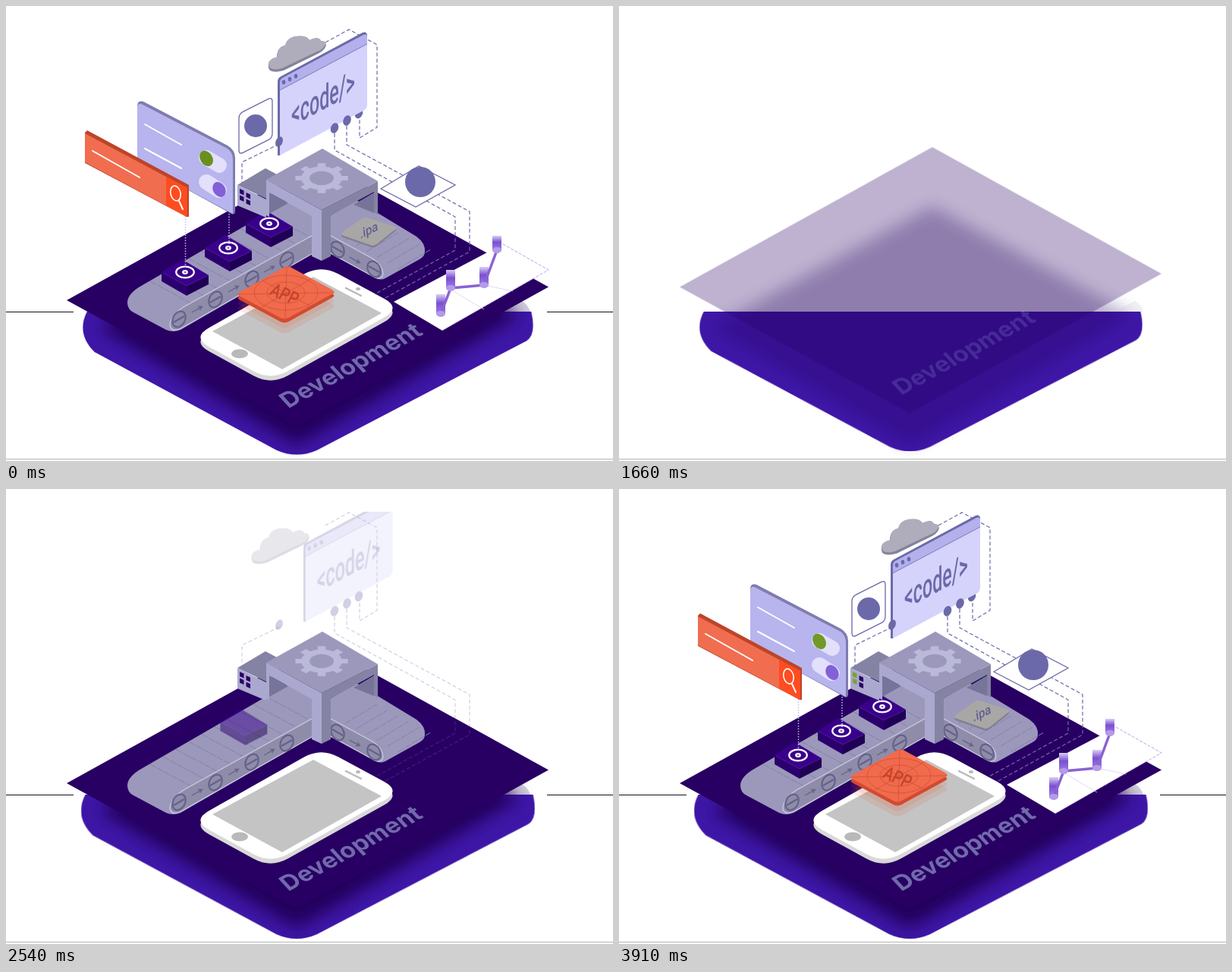
These frames come from a looping animation (800 by 600 pixels, 3960 ms). An HTML page:

```html
<!DOCTYPE html>
<html lang="en">
<head>
<meta charset="utf-8">
<title>Development</title>
<style>
html,body{margin:0;width:100%;height:100%;overflow:hidden;background:#fff}
svg{display:block;width:800px;height:600px}
text{font-family:Roboto,"Open Sans",sans-serif}
.dash{fill:none;stroke:#6b69a9;stroke-width:1.2;stroke-dasharray:5 3}
.ink{fill:#6b69a9}
.card{fill:#fff;stroke:#6b69a9;stroke-width:1.3}
.white{fill:none;stroke:#fff;stroke-width:2;stroke-linecap:round}
.dots{stroke:#c3bcec;stroke-width:1.5;stroke-dasharray:1.5 2}
.pill{stroke:#e2e0fa;stroke-width:20;stroke-linecap:round}
.grid{fill:none;stroke:#cf5238;stroke-width:.8}
</style>
</head>
<body>
<svg viewBox="0 0 800 600">
<defs>
  <path id="tray" d="M103 403Q88 432 113 457L356 588Q383 600 410 588L690 442Q703 433 696 403Z"/>
  <clipPath id="stage"><rect y="30" width="800" height="564"/></clipPath>
  <clipPath id="low"><rect y="403" width="800" height="191"/></clipPath>
  <clipPath id="shade"><path d="M0 0H800V403H0Z"/><use href="#tray"/></clipPath>
  <filter id="blur" x="-10%" y="-10%" width="120%" height="120%"><feGaussianBlur stdDeviation="11"/></filter>
  <linearGradient id="bar" x2="0" y2="1"><stop stop-color="#d9cff6"/><stop offset=".45" stop-color="#7a4fd0"/><stop offset="1" stop-color="#9d7ee4"/></linearGradient>
  <linearGradient id="haze" x2="0" y2="1"><stop stop-color="#fff" stop-opacity=".1"/><stop offset="1" stop-color="#fff" stop-opacity=".5"/></linearGradient>
  <g id="wheel" fill="none" stroke="#65628a" stroke-width="2.2"><ellipse rx="8" ry="11" transform="rotate(28)"/><path d="M-7 4L7 -4"/></g>
  <path id="arrow" d="M-7 4L5 -2.6M1 -3.5L6.5 -3.5L3.5 1" fill="none" stroke="#65628a" stroke-width="1.3"/>
</defs>
<path d="M0 597.5H800" stroke="#b4b4b4"/>
<path id="sides" stroke="#14101c" d="M0 403.5H89M713 403.5H800"/>
<g clip-path="url(#low)"><use id="base" href="#tray" fill="#3f17a8"/></g>

<g clip-path="url(#stage)"><g id="scene">
  <g id="shadow">
    <path fill="#d3cfdb" d="M652 403L680 389Q688 394 691 403Z"/>
    <g clip-path="url(#shade)"><path fill="#24005c" filter="url(#blur)" d="M413 264L122 424L383 580L678 408Z"/></g>
  </g>
  <g id="plate">
    <path fill="#280063" d="M80 388L413 203.5L715 370.5L383 554Z"/>
    <text transform="matrix(.876 -.482 .66 .72 372 531)" font-size="31.5" font-weight="700" fill="#716aac" style="font-family:Inter,'Open Sans',sans-serif">Development</text>
  </g>

  <g id="belts">
    <path fill="#9c98bc" d="M160 391Q160 379 180 368L372 257L403 275V327L230 427Q220 431 211 427L168 404Q160 400 160 391Z"/>
    <g id="slatsL" stroke="#8582a6" stroke-dasharray="9 1.5"></g>
    <path fill="#8f8caa" stroke="#cccbe2" stroke-width="1.3" d="M403 303L234 397Q217 408 216 421Q218 431 231 425L403 327"/>
    <path fill="#9c98bc" d="M428 276L462 256L541 304Q553 313 552 324Q552 330 545 334L500 359Q494 362 488 359L428 327Z"/>
    <g id="slatsR" stroke="#8582a6" stroke-dasharray="9 1.5"></g>
    <path fill="#8f8caa" stroke="#cccbe2" stroke-width="1.3" d="M428 303L483 333Q496 341 497 353Q495 362 486 358L428 326"/>
    <g id="wheels"></g>
  </g>

  <g id="box2"></g><g id="box3"></g><g id="box1"></g>

  <g id="machine">
    <path fill="#8583a3" d="M305 236L342 214L370 229L343 254Z"/>
    <path fill="#aaa8cf" d="M305 236L343 255V279L305 263Z"/>
    <g id="lamps"></g>
    <path fill="#77749a" d="M347 246L372 260L347 274ZM458 262L485 246V273Z"/>
    <path fill="#aaa8cf" d="M343 229L416 269V336L403 330V277L347 246V278L343 276Z"/>
    <path fill="#8583a3" d="M416 269L490 231V275L485 272V245L428 276V330L416 336Z"/>
    <path fill="#9c98bc" d="M417 188L490 231L416 269L343 229Z"/>
    <path id="gear" fill="#bbb9da" fill-rule="evenodd"/>
  </g>

  <g id="ipa">
    <path id="ipaEdge" fill="#817f8c"/><path id="ipaTop" fill="#a9a7a5"/>
    <text transform="matrix(.85 -.42 .12 1 467 307)" font-size="17" font-weight="500" fill="#625f91">.ipa</text>
  </g>

  <g id="phone">
    <path id="phoneEdge" fill="#d9d9d9"/><path id="phoneTop" fill="#fff"/>
    <path fill="#c4c4c4" d="M272 429L405 357L495 405L364 479Z"/>
    <ellipse cx="308" cy="458.5" rx="11" ry="6" fill="#b9b9b9"/>
    <path d="M448 372L468 382" stroke="#b9b9b9" stroke-width="2.5" stroke-linecap="round"/>
    <ellipse cx="464" cy="373" rx="3" ry="2" fill="#b9b9b9"/>
  </g>

  <g id="lines">
    <path class="dash" d="M360 182L311 206V233M421 48L452 31L489 51V160L466 174V148M433 168V190L592 278V322L486 380M449 158V183L611 271V324L498 386"/>
    <ellipse class="ink" cx="465" cy="141.5" rx="5" ry="7" transform="rotate(22 465 141.5)"/>
  </g>
  <g id="swift">
    <path id="cardS" class="card"/>
    <circle class="ink" cx="329" cy="158" r="15"/>
  </g>
  <g id="tools">
    <path class="card" d="M494 241L544 211L592 236L540 265Z"/>
    <circle class="ink" cx="546" cy="232" r="20"/>
  </g>
  <g id="cloud">
    <path fill="#85839a" d="M347 84Q342 71 357 68Q357 54 368 52Q371 40 386 40Q396 39 400 45Q412 39 415 46Q424 47 421 54Q419 59 411 63L366 85Q352 89 347 84Z"/>
    <path fill="#afadbb" d="M347 80Q343 70 358 67Q357 54 368 52Q371 40 386 39.5Q396 39 400 45Q412 39 415 46Q424 46 420 52Q418 57 410 60L364 82Q351 86 347 80Z"/>
  </g>
  <g id="window">
    <path class="ink" d="M358 100Q358 95 362 93L470 35Q475 33 476 38V44L361 197H358Z"/>
    <path fill="#d5d3fb" d="M361 101L476 39V130Q476 135 471 138L361 197Z"/>
    <path fill="#b3b0ec" d="M361 101Q361 97 364 95L471 38Q476 36 476 41V50L361 111Z"/>
    <path d="M361 111L476 50" stroke="#6b69a9" stroke-width=".8"/>
    <g class="ink"><ellipse cx="366" cy="100.5" rx="2.3" ry="3"/><ellipse cx="374" cy="96.5" rx="2.3" ry="3"/><ellipse cx="382" cy="92.5" rx="2.3" ry="3"/></g>
    <text class="ink" transform="matrix(.58 -.31 0 1.1 376 159)" font-size="40" font-weight="500">&lt;code/&gt;</text>
  </g>
  <g id="nodes" class="ink">
    <ellipse cx="360" cy="179" rx="4.5" ry="7" transform="rotate(22 360 179)"/>
    <ellipse cx="433" cy="161" rx="5" ry="7" transform="rotate(22 433 161)"/>
    <ellipse cx="449.5" cy="151" rx="5" ry="7" transform="rotate(22 449.5 151)"/>
  </g>

  <g id="chart">
    <g id="plain">
      <path fill="#fff" d="M511 390L655 314L715 348L575 428Z"/>
      <path d="M655 314L715 348L575 428" fill="none" stroke="#a78fe0" stroke-width=".8" stroke-dasharray="4 2"/>
      <path d="M586 374L630 400M630 368L668 376" stroke="#d8d0f0" stroke-width=".8" fill="none"/>
      <g id="bars"></g>
      <path d="M573 406L586 372L630 368L647 322" fill="none" stroke="#8a62d4" stroke-width="3.5" stroke-linejoin="round"/>
      <g class="knots" fill="#b49ae8"></g>
    </g>
    <g id="tint">
      <path fill="#4614b8" d="M511 390L655 314L715 348L618 403H534Z"/>
      <g id="hazes"></g>
      <path d="M573 406L586 372L630 368L647 322" fill="none" stroke="#fff" stroke-width="4"/>
      <g class="knots" fill="#fff"></g>
    </g>
  </g>

  <g id="app">
    <path id="appGlow" fill="#e0532f" opacity=".13"/><path id="appGlow2" fill="#e0532f" opacity=".13"/>
    <path id="appEdge" fill="#d24a30"/><path id="appTop" fill="#f16a4c"/>
    <g class="grid"><path d="M338 362L400 395M402 360L337 397M305 380L433 378M370 344L368 412"/><ellipse cx="369" cy="378" rx="42" ry="23"/><ellipse cx="369" cy="378" rx="25" ry="14"/></g>
    <text transform="matrix(.66 .29 -.42 .8 346 380)" font-size="27" font-weight="500" fill="#c5442b">APP</text>
  </g>

  <g id="toggles">
    <path d="M294 274V318" class="dots"/>
    <path fill="#7f7cae" d="M173 132Q173 124 181 126L292 184Q302 190 302 200V270Q302 276 297 274L173 206Z"/>
    <path fill="#b7b4ee" d="M173 134Q173 127 180 130L290 187Q299 192 299 202V274L173 206Z"/>
    <path class="white" d="M183 156L231 183M183 188L231 214"/>
    <path class="pill" d="M264 200L281 210M264 232L281 243"/>
    <ellipse id="on" cx="264" cy="201" rx="8" ry="11" transform="rotate(-32 264 201)" fill="#6b8f1f"/>
    <ellipse id="off" cx="281" cy="242" rx="8" ry="10.5" transform="rotate(-32 281 242)" fill="#8260d8"/>
  </g>
  <g id="search">
    <path d="M236.5 277V346" class="dots"/>
    <path fill="#bd4429" d="M104 167L107 164L241 236V278L238 278L104 207Z"/>
    <path fill="#f16d50" d="M104 168L239 240V278L104 206Z"/>
    <path fill="#ff4c20" d="M211 225L239 240V278L211 263Z"/>
    <path class="white" d="M114 191L176 226M228 257L233 268"/>
    <ellipse class="white" style="stroke-width:1.6" cx="223.5" cy="247" rx="6.5" ry="10" transform="rotate(-14 223.5 247)"/>
  </g>
</g></g>
<g id="cut"><path fill="#fff" d="M534 403H618L575 428Z"/><path stroke="#14101c" d="M0 403.5H800"/></g>
</svg>
<script>
const LOOP = 3960, GONE = 1520;
const $ = id => document.getElementById(id);

// closed polygon with softened corners
function soft(pts, r, dy = 0) {
  const n = pts.length;
  const toward = (p, q) => {
    const k = r / Math.hypot(q[0] - p[0], q[1] - p[1]);
    return [p[0] + (q[0] - p[0]) * k, p[1] + (q[1] - p[1]) * k + dy];
  };
  return pts.map((p, i) =>
    (i ? 'L' : 'M') + toward(p, pts[(i + n - 1) % n]) + 'Q' + [p[0], p[1] + dy] + ' ' + toward(p, pts[(i + 1) % n])
  ).join('') + 'Z';
}
function shape(id, pts, r, dy) { $(id).setAttribute('d', soft(pts, r, dy)); }

const phone = [[245, 437], [415, 341], [521, 398], [349, 494]];
shape('phoneEdge', phone, 26, 6);
shape('phoneTop', phone, 26);
const app = [[303, 380], [371, 342], [435, 377], [367, 414]];
shape('appTop', app, 6);
shape('appEdge', app, 6, 5);
shape('appGlow', app, 6, 12);
shape('appGlow2', app, 6, 19);
const ipa = [[440, 301], [472, 278], [516, 292], [485, 317]];
shape('ipaTop', ipa, 5);
shape('ipaEdge', ipa, 5, 2.5);
shape('cardS', [[307, 142], [351, 120], [351, 174], [307, 196]], 6);

// gear lying on the machine's roof
let gear = '';
for (let i = 0; i < 8; i++) {
  [[-.36, 27], [-.2, 27], [-.15, 35], [.15, 35], [.2, 27], [.36, 27]].forEach(([a, r]) => {
    const q = i * Math.PI / 4 + a;
    gear += (gear ? 'L' : 'M') + [416 + r * Math.cos(q), 227 + r * .57 * Math.sin(q)];
  });
}
$('gear').setAttribute('d', gear + 'ZM400 227a16 9.3 0 1 0 32 0a16 9.3 0 1 0 -32 0Z');

const put = (id, list, f) => $(id).innerHTML = list.map(f).join('');
const steps = n => [...Array(n).keys()];
put('slatsL', steps(10), i => `<path d="M${190 + i * 17} ${363 - i * 9.9}l54 29"/>`);
put('slatsR', steps(6), i => `<path d="M${447 + i * 14} ${309 + i * 7.5}l42 -25"/>`);
$('wheels').innerHTML =
  [[228, 413], [276, 387], [324, 360], [370, 335]].map(p => `<use href="#wheel" x="${p[0]}" y="${p[1]}"/>`).join('') +
  [[252, 400], [300, 373], [347, 347]].map(p => `<use href="#arrow" x="${p[0]}" y="${p[1]}"/>`).join('') +
  [[437, 321], [485, 347]].map(p => `<use href="#wheel" transform="translate(${p}) scale(-1 1)"/>`).join('') +
  '<use href="#arrow" transform="translate(460 335) rotate(58)"/>';
put('lamps', steps(4), i => {
  const x = 308 + (i % 2) * 8.5, y = 241 + (i % 2) * 5 + (i >> 1) * 8.5;
  return `<path class="lamp${i % 2}" fill="#2a0064" d="M${x} ${y}l5.5 2.5v6l-5.5 -2.5Z"/>`;
});

const boxes = { box1: [236, 351], box2: [293, 319], box3: [347, 287] };
for (const id in boxes) {
  $(id).innerHTML = `<g transform="translate(${boxes[id]})">
    <path fill="#2b006e" d="M-31 0L2 18V31L-31 12Z"/><path fill="#200056" d="M2 18L31 4V16L2 31Z"/>
    <path fill="#3a008c" d="M-4 -17L31 4L2 18L-31 0Z"/>
    <g class="ring" fill="none" stroke="#fff" stroke-width="2.2"><ellipse rx="11.8" ry="7.4"/><ellipse rx="2.8" ry="1.8"/></g></g>`;
}

const knots = [[573, 406, 26], [586, 372, 24], [630, 368, 24], [647, 322, 19]];
const column = fill => ([x, y, h]) => `<rect x="${x - 6}" y="${y - h}" width="12" height="${h}" fill="url(#${fill})"/>`;
put('bars', knots, column('bar'));
put('hazes', knots, column('haze'));
document.querySelectorAll('.knots').forEach(g =>
  g.innerHTML = knots.map(([x, y]) => `<ellipse cx="${x}" cy="${y}" rx="6" ry="4"/>`).join(''));

// rows of [time, style]
function play(el, rows, easing = 'linear') {
  const frames = rows.map(([t, css]) => ({ offset: t / LOOP, easing, ...css }));
  el.animate(frames, { duration: LOOP, iterations: Infinity });
}
const hold = (el, prop, rows) => play(el, [...rows, [LOOP, rows.at(-1)[1]]].map(([t, v]) => [t, { [prop]: v }]), 'step-end');

function enter(id, from, to, dx = 0, dy = 0) {
  const there = { opacity: 1, transform: 'translate(0px,0px)' };
  const away = { opacity: 0, transform: `translate(${dx}px,${dy}px)` };
  play($(id), [[0, there], [GONE, there], [GONE, away], [from, away], [to, there], [LOOP, there]]);
}

play($('scene'), [[0, { opacity: 1 }], [900, { opacity: 1 }], [1390, { opacity: .24 }],
  [GONE, { opacity: 0 }], [GONE, { opacity: 1 }], [LOOP, { opacity: 1 }]]);

[
  ['shadow', 1540, 1940],
  ['plate', 1540, 1940, 0, -25],
  ['phone', 1980, 2200, 0, -20],
  ['belts', 2040, 2300, 0, -20],
  ['machine', 2160, 2440, 0, -25],
  ['box3', 2440, 2640, -68, 40],
  ['lines', 2460, 2720],
  ['nodes', 2460, 2720],
  ['window', 2470, 2720, 47, -31],
  ['cloud', 2470, 2720, -31, 17],
  ['swift', 2640, 2860, -20, 10],
  ['tools', 2660, 2880, 20, 10],
  ['box2', 2740, 2960, -68, 40],
  ['box1', 3230, 3440, -50, 29],
  ['toggles', 3230, 3480, -24, -13],
  ['search', 3300, 3560, -24, -13],
  ['ipa', 3240, 3460, -30, -16],
  ['app', 3300, 3560, 0, -25],
  ['chart', 3420, 3700, 20, 11]
].forEach(a => enter(...a));

const size = (x, y = x) => ({ transform: `scale(${x},${y})` });
$('base').style.transformOrigin = '398px 403px';
play($('base'), [[0, size(.987)], [50, size(1)], [910, size(1)], [1390, size(.95, .938)],
  [1540, size(.95, .938)], [1800, size(.995)], [LOOP, size(.995)]]);

hold($('sides'), 'opacity', [[0, 1], [910, 0], [2000, 1]]);
hold($('cut'), 'opacity', [[0, 0], [950, 1], [1470, 0]]);
hold($('plain'), 'opacity', [[0, 1], [950, 0], [GONE, 1]]);
hold($('tint'), 'opacity', [[0, 0], [950, 1], [GONE, 0]]);

hold($('on'), 'fill', [[0, '#6b8f1f'], [50, '#64a42c'], [GONE, '#8481b5'], [3600, '#6f9a26']]);
hold($('off'), 'fill', [[0, '#8260d8'], [50, '#7773b8'], [GONE, '#8260d8']]);
hold($('appTop'), 'fill', [[0, '#f16a4c'], [50, '#f27355'], [GONE, '#f16a4c']]);
document.querySelectorAll('.lamp0').forEach(e => hold(e, 'fill', [[0, '#2a0064'], [50, '#5fa038'], [GONE, '#2a0064'], [3860, '#7ba32a']]));
document.querySelectorAll('.lamp1').forEach(e => hold(e, 'fill', [[0, '#2a0064'], [50, '#f2603c'], [GONE, '#2a0064']]));
document.querySelectorAll('.ring').forEach(e => play(e, [[0, { stroke: '#fff' }], [1000, { stroke: '#fff' }],
  [1390, { stroke: '#8a4bd0' }], [GONE, { stroke: '#3a008c' }], [3100, { stroke: '#3a008c' }],
  [3210, { stroke: '#6b10b4' }], [3560, { stroke: '#fff' }], [LOOP, { stroke: '#fff' }]]));
</script>
</body>
</html>
```
